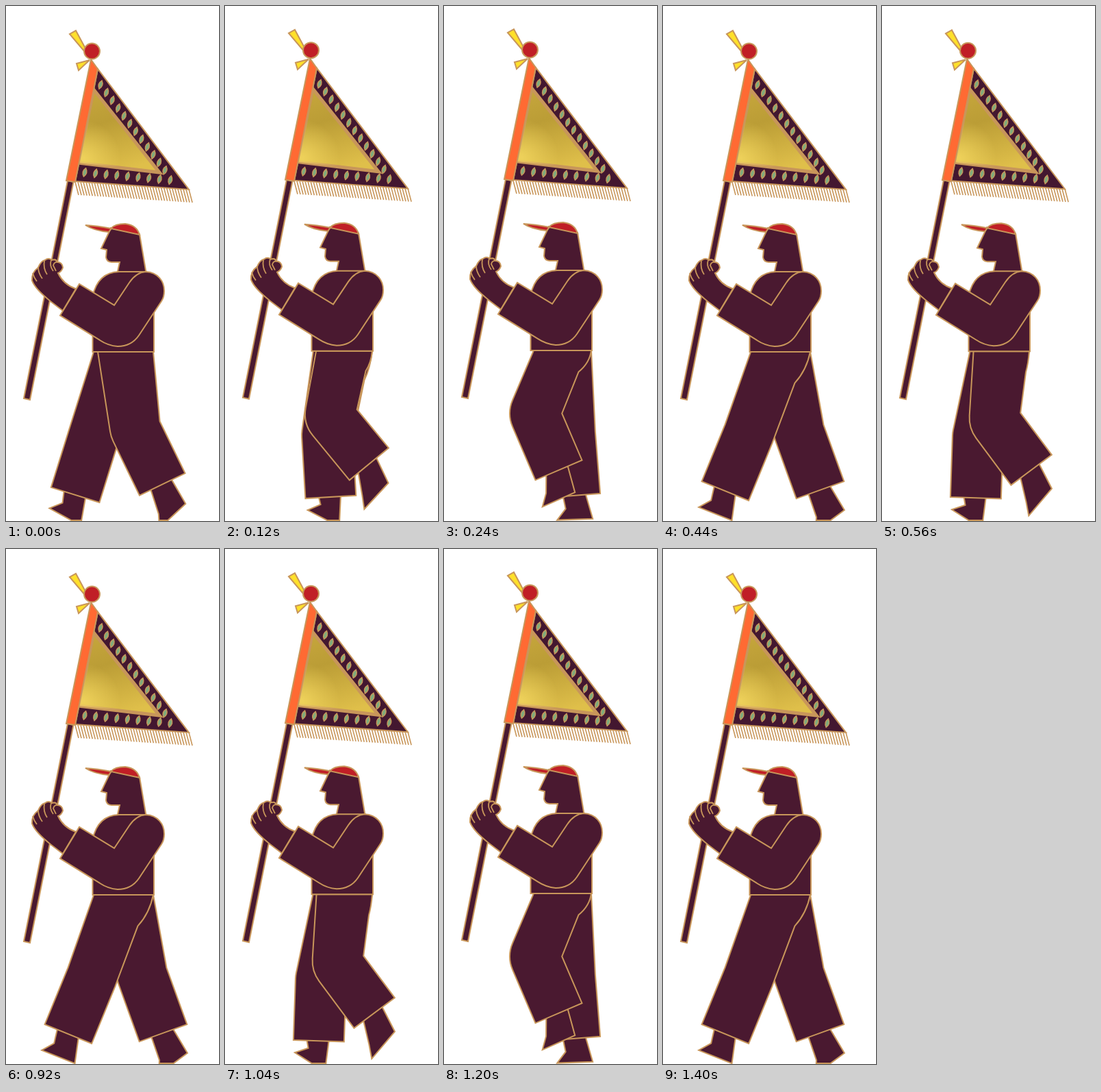
Write an HTML page with a canvas that moves like this. It is 311 px wide and 752 px high and loops after 1.44 s.

```html
<!DOCTYPE html>
<html lang="en">
<head>
<meta charset="utf-8">
<title>Flag bearer</title>
<style>
  html, body { margin: 0; width: 100%; height: 100%; overflow: hidden; background: #fff; }
  canvas { display: block; }
</style>
</head>
<body>
<canvas id="stage" width="311" height="752"></canvas>
<script>
const ctx = document.getElementById('stage').getContext('2d');
const PLUM = '#4a1930', TAN = '#c8965a', RED = '#c01f26', YELLOW = '#ffe02a', ORANGE = '#ff6a33';
const TICK = 40, STEP = 12, GROUND = 751;
const SHIN = 90, HALF = 37; // shin length, half the trouser width
const { sin, cos, max, PI } = Math;
const RAD = PI / 180;

const bob = tick => -1.05 * (1 - cos((tick + .5) / STEP * 2 * PI));

// Periodic joint motion over one stride (two steps)
function wave(tick, mean, c1, s1, c2, s2, s3) {
  const a = tick / STEP * PI;
  return mean + c1 * cos(a) + s1 * sin(a) + c2 * cos(2 * a) + s2 * sin(2 * a) + s3 * sin(3 * a);
}

// Point at (across, along) from p, for a limb swung back by angle
const from = ([x, y], angle, across, along) => [
  x + across * cos(angle) + along * sin(angle),
  y - across * sin(angle) + along * cos(angle)
];
const mix = (a, b, t) => a.map((v, i) => v + (b[i] - v) * t);

function polygon(points) {
  const path = new Path2D();
  points.forEach(p => path.lineTo(...p));
  path.closePath();
  return path;
}

function paint(path, fill, width = 2) {
  if (fill) { ctx.fillStyle = fill; ctx.fill(path); }
  ctx.strokeStyle = TAN;
  ctx.lineWidth = width;
  if (width) ctx.stroke(path);
}
const shape = (d, fill, width) => paint(new Path2D(d), fill, width);

function drawFoot(tick, cuff, shin) {
  const a = tick / STEP * PI;
  const tilt = -RAD * wave(tick, -10, 36, 14, 3, 0, 3);
  const sole = [cuff[0] - 15 * cos(a), cuff[1] + 39 - 7 * cos(a) - 4 * sin(a)];
  const foot = polygon([
    from(cuff, shin, -18, -4), from(sole, tilt, -13, -16), from(sole, tilt, -26, 0),
    from(sole, tilt, 26, 0), from(cuff, shin, 15, -4)
  ]);
  paint(foot, PLUM);
  ctx.save();
  ctx.clip(foot);
  shape(`M0 ${GROUND}H311`);
  ctx.restore();
}

function drawLeg(tick) {
  const hipY = 505 + bob(tick);
  const knee = [wave(tick, 158.2, -30.5, 26.8, .2, -7.1, .8), wave(tick, 616.4, 5.2, 14.7, 6.4, -3.2, -.3)];
  const shin = RAD * wave(tick, 9.1, -21.6, -6.6, -4.8, 12.3, 2.7);
  const thigh = Math.atan2(knee[0] - 171, knee[1] - hipY);
  const cuff = from(knee, shin, 0, SHIN);
  drawFoot(tick, cuff, shin);

  const bend = (thigh + shin) / 2, half = HALF / cos((shin - thigh) / 2);
  const kneeBack = from(knee, bend, half, 0), hipBack = [215, hipY];
  const lift = max(0, -sin(thigh)); // the seat folds when the thigh comes forward
  const fold = mix(kneeBack, hipBack, .66), curve = mix(kneeBack, hipBack, .8);

  const leg = new Path2D();
  leg.moveTo(131 - 3 * cos(tick / STEP * PI), hipY);
  leg.arcTo(...from(knee, bend, -half, 0), ...from(cuff, shin, -HALF, 0), 50);
  leg.lineTo(...from(cuff, shin, -HALF, 0));
  leg.lineTo(...from(cuff, shin, HALF, 0));
  leg.lineTo(...kneeBack);
  leg.lineTo(fold[0] - 10 * lift, fold[1]);
  leg.quadraticCurveTo(curve[0] + 16 * lift, curve[1], ...hipBack);
  leg.closePath();
  paint(leg, PLUM);
}

function drawLeaves(count, x, y, dx, dy, tilt) {
  for (let i = 0; i < count; i++) {
    ctx.save();
    ctx.translate(x + dx * i, y + dy * i);
    ctx.rotate(tilt);
    shape('M0-6.5Q5.6 0 0 6.5Q-5.6 0 0-6.5Z', '#7fac7c', 1.4);
    ctx.restore();
  }
}

const gold = ctx.createLinearGradient(128, 122, 165, 242);
gold.addColorStop(0, '#c6a63c');
gold.addColorStop(.4, '#bb9d36');
gold.addColorStop(1, '#dfbf4a');
const shine = ctx.createRadialGradient(112, 222, 2, 112, 222, 55);
shine.addColorStop(0, 'rgba(250,222,100,.7)');
shine.addColorStop(1, 'rgba(250,222,100,0)');

function drawFlag() {
  shape('M90 255L98.5 257L35 575L26 573Z', PLUM);

  let fringe = '';
  for (let i = 0; i <= 41; i++) fringe += `M${101 + i * 4.05} ${257 + i * .27}l5 19`;
  shape(fringe, null, 1.6);

  shape('M134 92L267 268L101 256Z', '#431730');
  const inner = 'M128 122L224 243L106 229Z';
  shape(inner, gold, 5);
  shape(inner, shine, 0);
  drawLeaves(12, 138, 115, 8.55, 11.35, .32);
  drawLeaves(9, 115, 243, 15.6, 1.4, .25);
  shape('M124 78L134 92L101 257L88 255Z', ORANGE);

  shape('M93 41L102 36L116 62L115 67Z', YELLOW);
  shape('M103 84L122 79L106 94Z', YELLOW);
  shape('M137 66A11.5 11.5 0 1 1 114 66A11.5 11.5 0 1 1 137 66Z', RED);
}

function drawBody() {
  // head
  shape('M151 329L139 354L147 356L146 367Q147 374 154 374L166 374L162 392L205 392L195 333L153 324Z', PLUM);
  shape('M153 325Q159 318 174 318Q191 320 195 334Z', RED);
  shape('M116 320Q134 321 154 325L150 330Q128 328 116 320Z', RED);
  // torso
  shape('M126.5 505V424Q134 389 165 388H205L216 420V505Z', PLUM);
  // hand
  shape('M83 445L66 432C52 421 41 409 38 401Q37 389 47 382Q51 372 57 371Q62 367 67 371Q73 369 75 374' +
        'Q82 374 83 382Q81 388 76 390Q84 407 102 413Z', PLUM);
  shape('M39 390Q41 397 45 402M47 381Q47 390 53 398M56 372Q54 383 60 392M66 371Q63 379 69 387' +
        'M75 374Q70 374 69 379L73 387', null, 1.8);
  // arm
  shape('M158 437L180 404Q190 389 204 388C222 389 231 402 231 416Q231 425 227 431L194 481' +
        'Q183 497 163 497Q149 496 137 488L79 452L107 406Z', PLUM);
}

function draw(tick) {
  ctx.fillStyle = '#fff';
  ctx.fillRect(0, 0, 311, 752);
  drawLeg(tick);
  drawLeg(tick + STEP);
  ctx.save();
  ctx.translate(0, bob(tick));
  drawFlag();
  drawBody();
  ctx.restore();
}

ctx.miterLimit = 3;
const start = performance.now();
function loop() {
  draw(Math.floor((performance.now() - start) / TICK) % STEP);
  requestAnimationFrame(loop);
}
loop();
</script>
</body>
</html>
```
